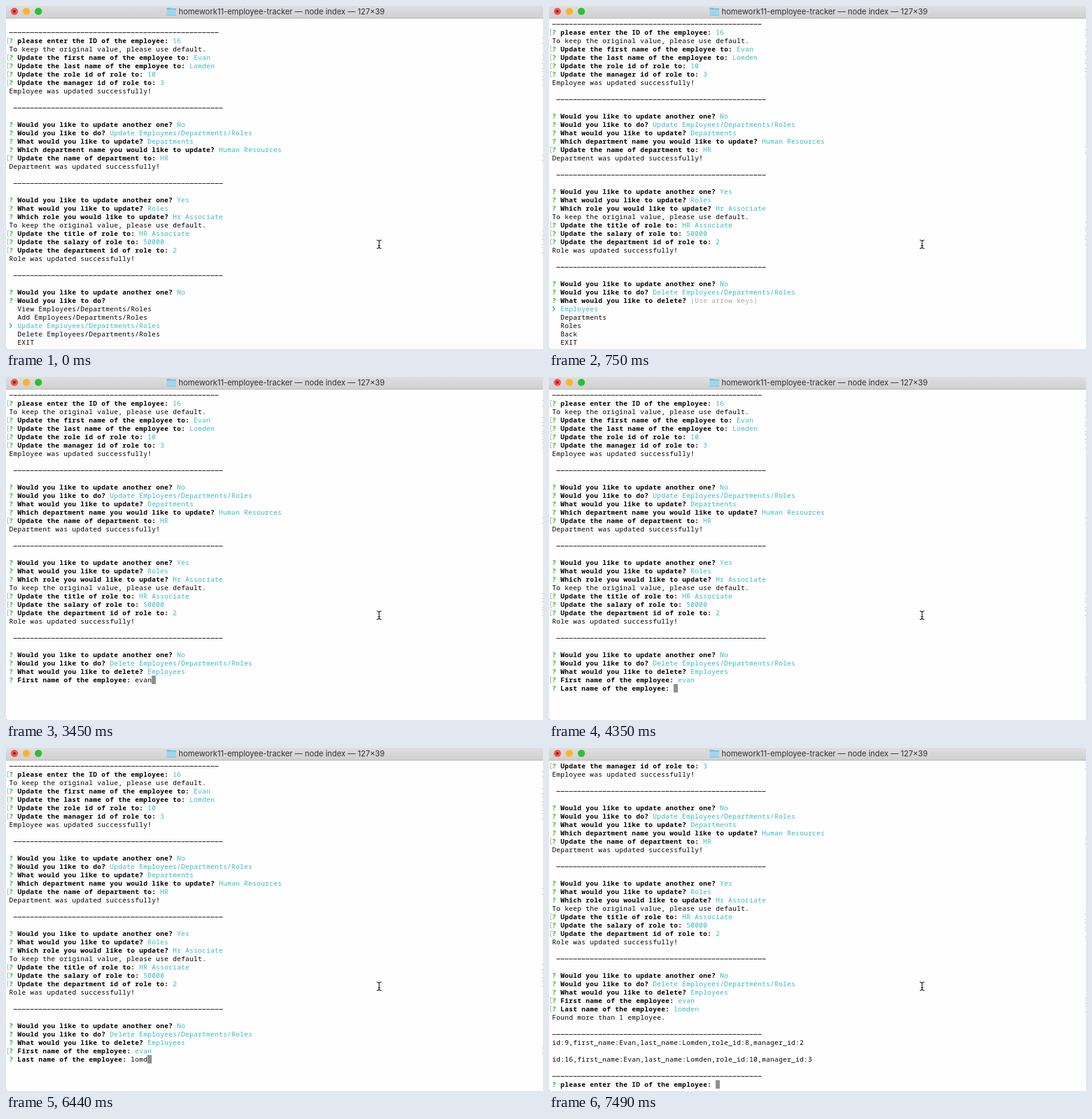
An HTML page with a canvas for the animation above (8000 ms loop, 896 by 573 pixels).

```html
<!DOCTYPE html>
<html lang="en">
<head>
<meta charset="utf-8">
<title>Terminal</title>
<style>
html, body { margin: 0; width: 100%; height: 100%; overflow: hidden; background: #fff; }
canvas { display: block; width: 896px; height: 573px; }
</style>
</head>
<body>
<canvas id="term" width="896" height="573"></canvas>
<script>
const ctx = document.getElementById('term').getContext('2d');
const LOOP = 8000, ROWS = 39, CELL = 7, LINE = 14, LEFT = 5, TOP = 23;
const MONO = '11px "Noto Sans Mono", "DejaVu Sans Mono", monospace';
const BLACK = '#000', CYAN = '#33b9c8', GREEN = '#2fb92f', GREY = '#a6a6a6';
const RULE = '-'.repeat(50);
const FIRST = 'Evan', LAST = 'Lomden';
const THINGS = 'Employees/Departments/Roles';

// "?" starts a prompt, "[" a prompt with line marks; "|" separates the answer.
const history = [
  '', RULE,
  '[please enter the ID of the employee:|16',
  'To keep the original value, please use default.',
  '[Update the first name of the employee to:|' + FIRST,
  '[Update the last name of the employee to:|' + LAST,
  '[Update the role id of role to:|10',
  '[Update the manager id of role to:|3',
  'Employee was updated successfully!',
  '', ' ' + RULE, '',
  '?Would you like to update another one?|No',
  '?Would you like to do?|Update ' + THINGS,
  '?What would you like to update?|Departments',
  '?Which department name you would like to update?|Human Resources',
  '[Update the name of department to:|HR',
  'Department was updated successfully!',
  '', ' ' + RULE, '',
  '?Would you like to update another one?|Yes',
  '?What would you like to update?|Roles',
  '?Which role you would like to update?|Hr Associate',
  'To keep the original value, please use default.',
  '[Update the title of role to:|HR Associate',
  '[Update the salary of role to:|50000',
  '[Update the department id of role to:|2',
  'Role was updated successfully!',
  '', ' ' + RULE, '',
  '?Would you like to update another one?|No'
];
const actions = ['View ', 'Add ', 'Update ', 'Delete '].map(a => a + THINGS).concat('EXIT');
const targets = ['Employees', 'Departments', 'Roles', 'Back', 'EXIT'];
const first = FIRST.toLowerCase(), last = LAST.toLowerCase();

// Each key press: time and the input text after it.
const firstKeys = [[1950, ''], ...[...first].map((_, i) => [3000 + i * 150, first.slice(0, i + 1)])];
const lastKeys = [
  [4350, ''], [4950, last.slice(0, 1)], [5240, last.slice(0, 2)], [5390, last.slice(0, 3)],
  [5690, last.slice(0, 3) + last[4]], [6290, last.slice(0, 3)], [6440, last.slice(0, 4)], [7040, last]
];
const typed = (keys, t) => keys.filter(k => k[0] <= t).pop()[1];

const menu = (items, chosen) => items.map((s, i) => (i === chosen ? '>' : '  ') + s);
const input = (question, text) => `?${question}|${text}_`;

function screen(t) {
  if (t < 750) return { scroll: 0, lines: [...history, '?Would you like to do?|', ...menu(actions, t < 150 ? 2 : 3)] };
  const lines = [...history, '?Would you like to do?|Delete ' + THINGS];
  if (t < 1950) {
    lines.push('?What would you like to delete?|(Use arrow keys)', ...menu(targets, 0));
    return { scroll: 1, lines };
  }
  lines.push('?What would you like to delete?|Employees');
  if (t < 4350) {
    lines.push(input('First name of the employee:', typed(firstKeys, t)));
    return { scroll: 1, lines };
  }
  lines.push('[First name of the employee:|' + first);
  if (t < 7340) lines.push(input('Last name of the employee:', typed(lastKeys, t)));
  else if (t < 7490) lines.push('[_');
  else {
    const record = (id, role, boss) =>
      `id:${id},first_name:${FIRST},last_name:${LAST},role_id:${role},manager_id:${boss}`;
    lines.push('[Last name of the employee:|' + last, 'Found more than 1 employee.', '', RULE,
      record(9, 8, 2), '', record(16, 10, 3), '', RULE, input('please enter the ID of the employee:', ''));
    return { scroll: 7, lines };
  }
  return { scroll: 1, lines };
}

function rect(color, x, y, w, h) {
  ctx.fillStyle = color;
  ctx.fillRect(x, y, w, h);
}

function disc(color, x, y, r) {
  ctx.fillStyle = color;
  ctx.beginPath();
  ctx.arc(x, y, r, 0, Math.PI * 2);
  ctx.fill();
}

function write(str, col, y, color, bold) {
  ctx.font = (bold ? 'bold ' : '') + MONO;
  ctx.fillStyle = color;
  [...str].forEach((ch, i) => {
    const x = LEFT + (col + i) * CELL;
    if (ch === '-') ctx.fillRect(x + 0.5, y + 7, 6, 1);
    else if (ch !== ' ') ctx.fillText(ch, x + CELL / 2, y + 11);
  });
}

const caret = (col, y) => rect('#8f8f8f', LEFT + col * CELL, y, CELL, LINE);

function marks(y) {
  rect('#b4b4b4', 2, y + 2, 1, 10);
  for (const dy of [2, 11]) {
    rect('#b4b4b4', 2, y + dy, 3, 1);
    rect('#b4b4b4', 894, y + dy, 2, 1);
  }
}

function prompt(line, y) {
  let [question, answer] = line.slice(1).split('|');
  const col = question.length + 3;
  write('?', 0, y, GREEN, true);
  write(question, 2, y, BLACK, true);
  if (answer.endsWith('_')) {
    answer = answer.slice(0, -1);
    write(answer, col, y, BLACK);
    caret(col + answer.length, y);
  } else {
    write(answer, col, y, answer[0] === '(' ? GREY : CYAN);
  }
}

function pointer(y) {
  ctx.strokeStyle = CYAN;
  ctx.lineWidth = 1.7;
  ctx.beginPath();
  ctx.moveTo(6.2, y + 3.2);
  ctx.lineTo(9.4, y + 7);
  ctx.lineTo(6.2, y + 10.8);
  ctx.stroke();
}

function drawLine(line, y) {
  if (line[0] === '[') marks(y);
  if (line === '[_') caret(0, y);
  else if (line[0] === '?' || line[0] === '[') prompt(line, y);
  else if (line[0] === '>') {
    pointer(y);
    write(line.slice(1), 2, y, CYAN);
  } else write(line, 0, y, BLACK);
}

function titleBar() {
  const shade = ctx.createLinearGradient(0, 0, 0, 20);
  shade.addColorStop(0, '#dedede');
  shade.addColorStop(1, '#d0d0d0');
  rect(shade, 0, 0, 896, 20);
  rect('#b5b5b5', 0, 20, 896, 1);
  ['#fc4f4b', '#fdb32c', '#29c132'].forEach((c, i) => disc(c, 14 + i * 20, 9, 6));
  disc('#6b0a08', 14, 9, 2);
  rect('#78bfe2', 268, 3, 7, 3);
  rect('#78bfe2', 268, 4, 16, 12);
  rect('#9bd6f1', 268, 6, 16, 9);
  ctx.font = '13px Inter, "Liberation Sans", sans-serif';
  ctx.fillStyle = '#303030';
  ctx.textAlign = 'left';
  ctx.fillText('homework11-employee-tracker — node index — 127×39', 288, 14);
}

function mouse() {
  ctx.strokeStyle = '#111';
  ctx.lineWidth = 1.2;
  ctx.beginPath();
  for (const s of [-1, 1]) {
    ctx.moveTo(618.5, 398 + s * 7);
    ctx.quadraticCurveTo(622, 398 + s * 7, 622.5, 398 + s * 5);
    ctx.quadraticCurveTo(623, 398 + s * 7, 626.5, 398 + s * 7);
  }
  ctx.moveTo(622.5, 392);
  ctx.lineTo(622.5, 404);
  ctx.moveTo(620.5, 400.5);
  ctx.lineTo(624.5, 400.5);
  ctx.stroke();
}

function draw(t) {
  rect('#fefefe', 0, 0, 896, 573);
  titleBar();
  ctx.textAlign = 'center';
  const { scroll, lines } = screen(t);
  lines.slice(scroll, scroll + ROWS).forEach((line, i) => drawLine(line, TOP + i * LINE));
  rect('#c8aa70', 0, 571, 1, 2);
  mouse();
}

const start = performance.now();
function tick() {
  draw((performance.now() - start) % LOOP);
  requestAnimationFrame(tick);
}
tick();
</script>
</body>
</html>
```
